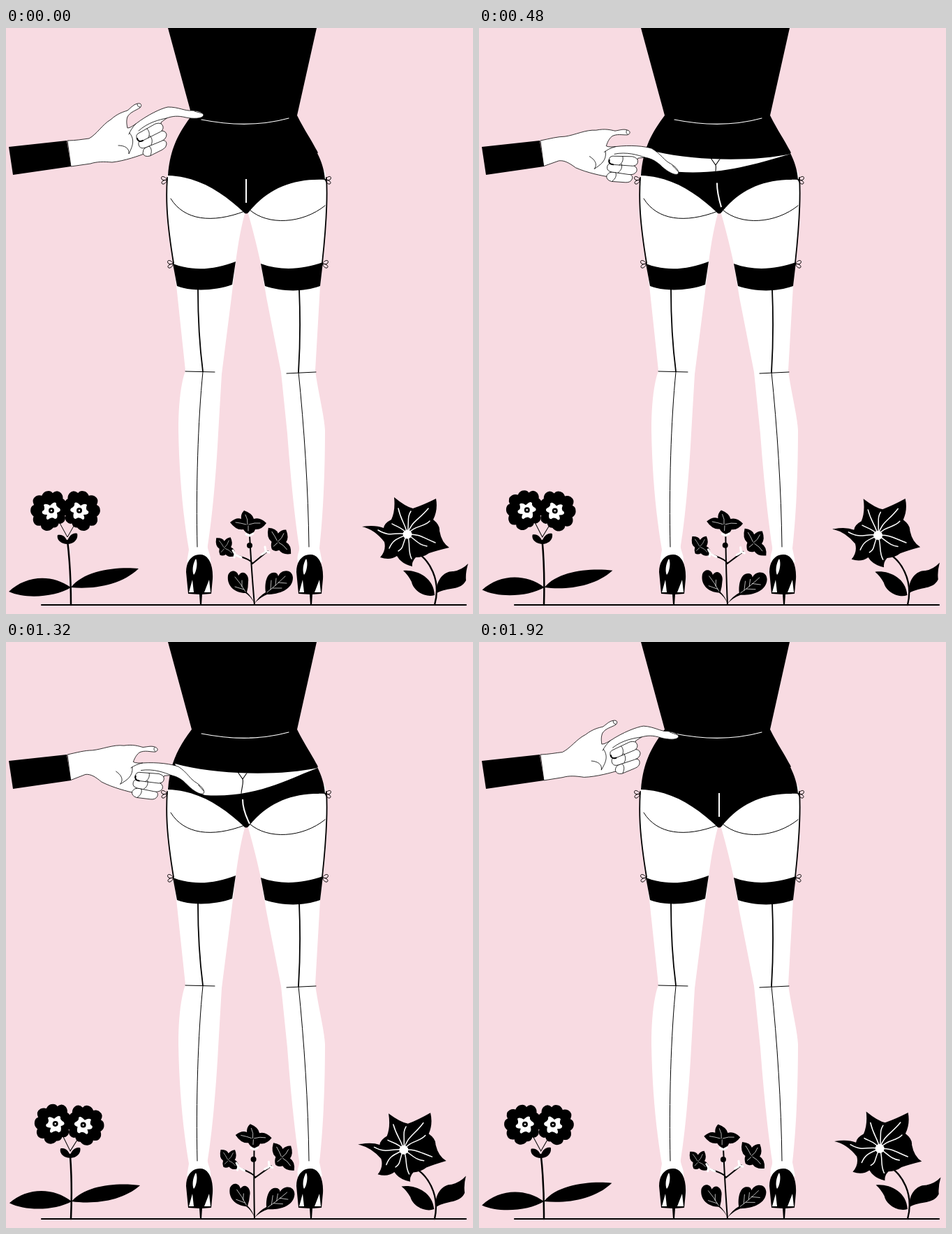
An HTML page for the animation above (2040 ms loop, 669x838 px).

```html
<!DOCTYPE html>
<html lang="en">
<head>
<meta charset="utf-8">
<title>Pink garden</title>
<style>
  html, body { margin: 0; width: 100%; height: 100%; overflow: hidden; background: #f8dbe2; }
  svg { display: block; width: 100vw; height: 100vh; }
  .line { fill: none; stroke: #000; stroke-linecap: round; }
  .vein { fill: none; stroke: #fff; stroke-linecap: round; }
  .skin { fill: #fff; stroke: #000; stroke-width: .8; stroke-linejoin: round; }
</style>
</head>
<body>
<svg viewBox="0 0 669 838" preserveAspectRatio="none">
  <defs>
    <g id="bow" class="line" stroke-width="1">
      <path d="M4,0 C-1,-7 -6,-5 -4,-1 C-3,1 1,1 4,0 C-2,0 -6,4 -3,6 C0,7 3,3 4,0"/>
    </g>
    <g id="shoe">
      <path d="M258,778 C258,761 268,752 279,753 C292,754 297,771 296,788 L294,809 L281,810 L280,825 H278 L277,810 L261,809 Z"/>
      <path fill="#fff" d="M272,759 C275,764 273,778 269,782 C266,776 268,765 272,759 Z M267,789 L262,807 H269 Z M291,789 L284,807 H293 Z"/>
    </g>
    <path id="petal" d="M0,2 C-20,-7 -18,-24 -9,-27 Q-3,-29 0,-25 Q6,-31 12,-26 C20,-18 12,-6 0,2 Z"/>
    <g id="blossom">
      <use href="#petal" transform="rotate(-72) scale(1.05)"/>
      <use href="#petal" transform="rotate(4)"/>
      <use href="#petal" transform="rotate(72) scale(.85)"/>
      <use href="#petal" transform="rotate(150) scale(.85)"/>
      <use href="#petal" transform="rotate(-145) scale(1.05)"/>
      <path fill="#fff" d="M-2,-7 Q5,-14 7,-10 Q6,-6 12,-3 Q15,1 8,3 Q10,12 5,12 Q1,8 -5,13 Q-9,13 -6,6 Q-15,6 -13,1 Q-8,-1 -11,-8 Q-8,-11 -2,-7Z"/>
      <circle r="4"/><circle r="1.2" fill="#fff"/>
    </g>
    <g id="lily">
      <path d="M-5,-18 Q7,-14 9,-6 Q18,-9 27,0 Q20,10 11,9 Q9,15 3,16 Q-3,14 -6,9 Q-16,11 -25,-1 Q-16,-9 -9,-6 Q-10,-13 -5,-18Z"/>
      <path class="vein" stroke-width=".7" d="M0,2 Q1,-5 -3,-12 M2,2 Q10,-1 18,0 M-2,2 Q-9,0 -17,-1 M1,4 V11"/>
    </g>
    <clipPath id="bandClip"><path id="bandShape"/></clipPath>
  </defs>

  <g id="legs">
    <path fill="#fff" d="M232,205 C229,235 230,265 234,295 L244,368 L257,490 C250,510 247,540 247,575 C248,640 254,700 262,746 L259,764 H293 C294,753 288,747 289,740 C297,690 302,620 304,580 L309,495 L323,385 L329,335 C333,305 337,283 343,262 V205 Z"/>
    <path fill="#fff" d="M457,205 C461,235 460,265 457,295 L450,369 L443,490 C447,520 456,555 457,575 C457,640 454,700 449,744 L453,764 H418 C416,753 421,750 420,742 C412,690 406,620 403,580 L394,492 L373,385 L365,337 C358,305 352,283 346,262 V205 Z"/>
    <path d="M239,337 C270,349 300,345 329,334 L324,367 C300,376 265,377 245,369 Z M365,337 C395,348 425,345 454,335 L450,369 C425,378 395,377 371,369 Z"/>
    <path class="line" stroke-width="1.8" d="M231,214 C229,245 230,275 240,336 M459,214 C461,245 458,290 453,336 M275,374 C275,420 278,460 282,491 M420,374 C422,420 421,460 419,492"/>
    <path class="line" stroke-width="1" d="M236,244 C255,275 295,280 342,262 M349,260 C375,283 425,280 457,254 M257,491 L299,492 M402,494 L444,492 M282,492 C275,560 272,660 274,742 M419,492 C427,570 433,660 434,742"/>
  </g>
  <path d="M232,0 H445 L417,125 C428,147 438,161 444,173 C449,181 446,178 446,179 C452,191 456,203 457,217 C410,215 375,230 348,263 Q344,268 340,263 C310,235 275,212 232,211 C235,170 249,148 266,125 Z"/>
  <path class="vein" stroke-width="1.2" d="M280,131 C320,139 365,140 405,129"/>
  <path id="seam" class="vein" stroke-width="2" style="stroke-linecap:butt"/>
  <g clip-path="url(#bandClip)">
    <path fill="#fff" d="M230,165 H450 V225 H230 Z"/>
    <path class="line" stroke-width="1.1" d="M332,186 L339,196 L346,186 M339,196 C341,204 336,211 337,221"/>
  </g>
  <use href="#bow" x="227" y="217"/>
  <use href="#bow" transform="translate(461 217) scale(-1 1)"/>
  <use href="#bow" x="236" y="337"/>
  <use href="#bow" transform="translate(457 337) scale(-1 1)"/>

  <g id="hand"></g>
  <path d="M4,170 L87,161 L93,198 L10,210 Z"/>

  <g id="plantA">
    <path class="line" stroke-width="2.5" d="M93,825 Q93,775 88,733"/>
    <path class="line" stroke-width="1" d="M77,708 L88,728 L100,707"/>
    <path d="M4,806 C28,783 65,780 93,800 C70,814 28,817 4,806 Z M93,800 C112,775 160,770 190,773 C165,797 125,803 93,800 Z M88,738 C78,738 72,731 74,725 C82,723 87,730 88,735 C89,727 96,721 102,723 C104,731 97,738 88,738 Z"/>
    <use href="#blossom" x="65" y="690"/>
    <use href="#blossom" transform="translate(105 690) scale(-1 1)"/>
  </g>

  <g id="plantB">
    <path class="line" stroke-width="2" d="M356,825 Q352,780 349,726 M353,766 Q352,760 326,753 M353,766 L375,748"/>
    <circle cx="349" cy="740" r="4"/>
    <use href="#lily" x="346" y="708"/>
    <use href="#lily" transform="translate(314 742) rotate(42) scale(.72 .85)"/>
    <use href="#lily" transform="translate(391 733) rotate(48) scale(.95 1)"/>
    <path class="vein" stroke-width="3" d="M344,724 L349,726 L354,723 M325,747 L328,752 L327,757 M371,742 L372,748 L377,750 M330,754 L337,757 M366,753 L371,750"/>
    <path d="M356,823 Q350,812 343,808 C328,808 316,798 318,783 C321,774 331,775 333,783 C339,773 349,782 347,792 Q347,800 345,807 Q352,813 356,823 Z M356,823 Q363,812 372,807 C370,793 374,780 382,779 Q389,778 390,784 C394,774 410,773 411,786 C411,803 391,810 374,810 Q364,814 356,823 Z"/>
    <path class="vein" stroke-width=".7" d="M343,806 Q336,794 328,785 M338,799 V790 M341,803 L328,799 M374,807 Q386,798 400,784 M379,803 L380,790 M386,797 L387,787 M382,801 L395,801 M390,793 L402,794"/>
  </g>

  <g id="plantC">
    <path class="line" stroke-width="2.3" d="M588,750 C606,760 624,789 614,825"/>
    <path d="M556,671 Q573,685 583,687 Q598,682 616,673 Q619,689 612,703 Q622,711 621,719 Q624,736 635,743 Q618,747 606,751 Q598,757 587,757 Q581,763 582,770 Q566,766 560,755 Q550,762 536,757 Q545,747 542,735 Q528,717 510,713 Q529,710 541,715 Q542,708 552,703 Q558,690 556,671 Z M614,811 C602,815 584,806 581,792 Q576,782 569,776 C587,774 613,785 614,811 Z M617,808 C615,791 627,776 641,777 Q653,775 662,766 Q658,779 659,790 C651,805 634,799 617,808 Z"/>
    <path class="vein" stroke-width="1.5" d="M575,724 C572,709 566,705 562,687 M575,724 C568,714 559,713 553,709 M575,724 C581,705 591,704 605,687 M575,724 C585,711 599,714 607,705 M575,724 C591,723 598,729 615,736 M575,724 C588,733 591,739 603,741 M575,724 C580,739 575,747 581,759 M575,724 C567,737 571,743 562,748 M575,724 C563,730 555,730 549,744 M575,724 C557,720 551,729 533,718 M575,724 C578,706 574,700 580,691"/>
    <circle cx="575" cy="724" r="6.5" fill="#fff"/>
  </g>
  <use href="#shoe"/>
  <use href="#shoe" x="158"/>
  <path class="line" stroke-width="2.2" d="M51,825 H659"/>
</svg>
<script>
const $ = id => document.getElementById(id);
const clamp = x => Math.max(0, Math.min(1, x));
const STEP = 120, STEPS = 17;
const handAngles = [0, 9, 18, 25.8, 30.5, 33.5, 33.5, 33.5, 33.5, 33.5, 33.5, 33.5, 32.5, 29.5, 23.7, 13.5, 4];

const handPaths = [
  // palm, thumb and index finger
  'M88,161 C100,161 110,159 119,158 C130,152 138,138 150,131 C160,122 168,120 174,118 C180,113 183,109 189,108 C194,107 195,111 192,114 C186,118 178,120 174,127 C172,133 173,138 174,143 C178,143 183,139 186,137 C203,124 222,115 232,113 C248,113 256,119 266,118 C276,118 283,121 283,125 C281,130 268,130 258,128 C246,125 238,126 230,129 L222,135 L226,166 L203,178 C190,183 170,190 152,192 C140,191 130,191 121,194 L93,198 Z',
  // folded fingers
  'M200,171 L221,161 Q230,159 230,166 Q230,171 224,174 L206,183 Q198,185 196,179 Q196,173 200,171 Z',
  'M194,160 L218,148 Q228,145 230,152 Q230,159 222,162 L200,171 Q192,174 190,167 Q189,162 194,160 Z',
  'M189,151 L214,137 Q223,134 225,141 Q226,147 218,150 L196,161 Q188,164 187,157 Q186,153 189,151 Z'
];
const handLines = 'M186,137 C181,142 178,147 176,152 M190,147 C203,135 220,131 230,129 M177,150 C186,161 180,171 176,180 C177,171 169,168 161,168 M202,144 C206,148 206,153 204,157 M206,154 C210,158 210,163 208,167 M188,109 C188,112 190,113 192,113 M205,169 C209,172 209,177 207,182 M270,119 C273,120 277,121 281,122';
const nailLines = 'M188,158 C189,162 192,163 196,161';

function addHandPath(d, cls, width) {
  const path = document.createElementNS('http://www.w3.org/2000/svg', 'path');
  path.setAttribute('class', cls);
  path.setAttribute('stroke-width', width);
  $('hand').append(path);
  return { path, d };
}
const handParts = [
  ...handPaths.map(d => addHandPath(d, 'skin', .8)),
  addHandPath(handLines, 'line', .8),
  addHandPath(nailLines, 'line', 2)
];

// Turn points around the wrist; the forearm end stays put.
function bend(d, degrees) {
  return d.replace(/([\d.]+),([\d.]+)/g, (_, px, py) => {
    const angle = degrees * clamp((px - 92) / 50) * Math.PI / 180;
    const x = px - 131, y = py - 171, c = Math.cos(angle), s = Math.sin(angle);
    return (131 + x * c - y * s).toFixed(2) + ',' + (171 + x * s + y * c).toFixed(2);
  });
}

const sway = (id, degrees, x) => $(id).setAttribute('transform', `rotate(${degrees} ${x} 825)`);

function draw(now) {
  const step = Math.floor(now / STEP) % STEPS;
  const angle = handAngles[step];
  const pull = clamp((angle - 25.8) / 7.7);
  const swing = Math.min(step, STEPS - step, 8) / 8;
  const mix = (a, b) => a + (b - a) * pull;

  for (const { path, d } of handParts) path.setAttribute('d', bend(d, angle));

  $('bandShape').setAttribute('d', pull
    ? `M242,174 C300,190 390,192 447,180 C${mix(390, 410)},${mix(191, 193)} ${mix(340, 360)},${mix(189, 224)} 285,${mix(185, 219)} C265,${mix(182, 212)} 252,${mix(178, 197)} 242,174 Z`
    : 'M0,0');
  $('seam').setAttribute('d', `M${mix(344, 339)},${mix(216, 225)} C${mix(344, 339)},${mix(228, 238)} 344,${mix(240, 250)} ${mix(344, 349)},${mix(250, 260)}`);

  sway('plantA', 3.2 * swing, 93);
  sway('plantB', 5 * swing, 356);
  sway('plantC', -4 * swing, 615);
}

const start = performance.now();
function tick() {
  draw(performance.now() - start);
  requestAnimationFrame(tick);
}
tick();
</script>
</body>
</html>
```
